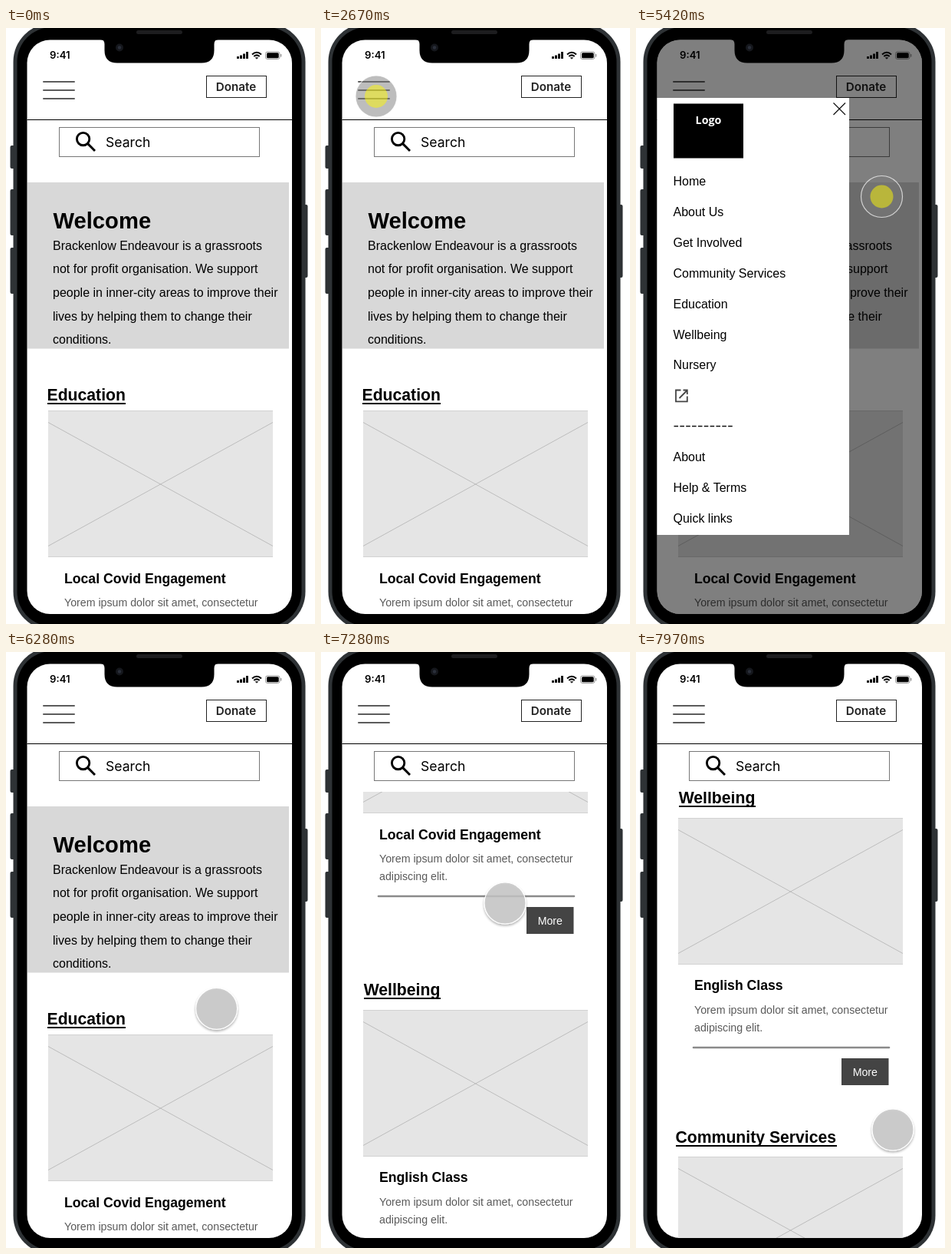
Recreate the animation shown at these times as an HTML page. Size 403 px wide and 776 px high, loop 8000 ms.

```html
<!DOCTYPE html>
<html lang="en">
<head>
<meta charset="utf-8">
<title>Mobile wireframe walkthrough</title>
<style>
  html, body { margin: 0; width: 100%; height: 100%; overflow: hidden; background: #fff; }
  svg { display: block; font-family: "Liberation Sans", Arial, sans-serif; }
  .ui { font-family: Inter, sans-serif; }
  .h2 { font-size: 21.2px; font-weight: 700; }
  .h3 { font-size: 17.65px; font-weight: 700; }
  .body { font-size: 16px; }
  .small { font-size: 14.2px; fill: #5a5a5a; }
</style>
</head>
<body>
<svg width="403" height="776">
  <defs>
    <clipPath id="screen"><rect x="27.500" y="15.500" width="345.500" height="747.500" rx="30"/></clipPath>
    <clipPath id="view"><rect x="27" y="182" width="346" height="581"/></clipPath>
    <g id="image">
      <rect x="55" y="498" width="293" height="191" fill="#e5e5e5"/>
      <path d="M55 513.5L348 674.5M55 674.5L348 513.5" stroke="#b8b8b8" stroke-width=".9"/>
      <path d="M55 498.5H348M55 688.5H348" stroke="#d2d2d2"/>
    </g>
    <g id="card">
      <use href="#image"/>
      <g class="small">
        <text x="76" y="753">Yorem ipsum dolor sit amet, consectetur</text>
        <text x="76" y="776">adipiscing elit.</text>
      </g>
      <path d="M75 797H330" stroke="#8a8a8a" stroke-width="2.6" stroke-linecap="round"/>
      <rect x="268" y="811" width="61.500" height="35" fill="#444"/>
      <text x="298.800" y="834" font-size="14.2" fill="#fff" text-anchor="middle">More</text>
    </g>
    <filter id="shadow" x="-30%" y="-30%" width="160%" height="160%">
      <feDropShadow dx="0" dy="2" stdDeviation="1.6" flood-opacity=".35"/>
    </filter>
  </defs>

  <!-- phone body -->
  <g fill="#2e3235">
    <rect x="5.500" y="153" width="8" height="30" rx="2"/>
    <rect x="5.500" y="210" width="8" height="60" rx="2"/>
    <rect x="5.500" y="286" width="8" height="60" rx="2"/>
    <rect x="386" y="230" width="7.500" height="95" rx="2"/>
    <rect x="9.500" y="-6" width="381" height="790" rx="50"/>
  </g>
  <rect x="14.500" y="-1" width="371" height="780" rx="45"/>
  <rect x="170" y="3" width="60" height="5" rx="2.500" fill="#1d1d1f"/>

  <g clip-path="url(#screen)">
    <rect x="27" y="15" width="346" height="748" fill="#fff"/>

    <!-- scrolling page -->
    <g clip-path="url(#view)"><g id="page">
      <rect x="28" y="201" width="341" height="216.500" fill="#d8d8d8"/>
      <text x="61.500" y="260.500" font-size="29.2" font-weight="700">Welcome</text>
      <g class="body">
        <text x="61" y="288.500">Brackenlow Endeavour is a grassroots</text>
        <text x="61" y="319">not for profit organisation. We support</text>
        <text x="61" y="349.500">people in inner-city areas to improve their</text>
        <text x="61" y="380.500">lives by helping them to change their</text>
        <text x="61" y="410.500">conditions.</text>
      </g>
      <g class="h2">
        <text x="53.500" y="485">Education</text>
        <text x="55.700" y="926">Wellbeing</text>
        <text x="51.500" y="1368">Community Services</text>
      </g>
      <path d="M54 489H156M56 930H156M52 1372H262" stroke="#000" stroke-width="2"/>
      <use href="#card"/>
      <use href="#card" y="447"/>
      <use href="#image" y="888"/>
      <g class="h3">
        <text x="76" y="723">Local Covid Engagement</text>
        <text x="76" y="1169">English Class</text>
      </g>
    </g></g>

    <!-- header -->
    <g class="ui">
      <text x="57" y="40" font-size="13.2" font-weight="600">9:41</text>
      <text x="300" y="82" font-size="15.2" font-weight="600" fill="#222" text-anchor="middle">Donate</text>
      <text x="130" y="154.500" font-size="17.6">Search</text>
    </g>
    <path d="M302.500 40V37M306.500 40V35.500M310.500 40V33.500M314.500 40V31" stroke="#000" stroke-width="2.800"/>
    <g fill="none" stroke="#000" stroke-width="2">
      <path d="M321 34.500Q327 29 333 34.500M323.300 37Q327 33.700 330.700 37"/>
      <path d="M325.500 38.800H328.500L327 40.200Z" stroke-width="1"/>
    </g>
    <rect x="338.500" y="31" width="18.500" height="9.500" rx="2.500" fill="none" stroke="#999"/>
    <rect x="340" y="32.300" width="15.700" height="7" rx="1.500"/>
    <path d="M358.700 34V37.500" stroke="#999" stroke-width="1.300"/>
    <path d="M49 70H89M49 81H89M49 92H89" stroke="#5c5c5c" stroke-width="2" stroke-linecap="round"/>
    <g fill="none" stroke="#222">
      <rect x="261.500" y="62.500" width="78" height="28"/>
      <path d="M27 119.500H373" stroke="#000"/>
      <rect x="69.500" y="129.500" width="261" height="38" stroke="#777"/>
      <g stroke="#000" stroke-width="2.900">
        <circle cx="100.600" cy="144.600" r="8.200"/>
        <path d="M106.400 150.400L116 160"/>
      </g>
    </g>

    <!-- side menu -->
    <g id="menu">
      <rect x="27" y="15" width="346" height="748" opacity=".5"/>
      <rect x="27" y="91" width="251" height="569" fill="#fff"/>
      <rect x="49" y="98.500" width="91" height="71"/>
      <text x="94.500" y="125" fill="#fff" text-anchor="middle"
        style="font:700 14.300px 'Open Sans','Noto Sans',sans-serif">Logo</text>
      <path d="M257.500 97.500L273 113M273 97.500L257.500 113" stroke="#111" stroke-width="1.200"/>
      <g id="items" class="body"></g>
      <path d="M58.500 471.500H52V486.300H66.800V479.500M61.500 471.500H66.800V477M66.500 472L56.500 482"
        fill="none" stroke="#444" stroke-width="1.800"/>
      <path d="M49.500 518.500H126" stroke="#111" stroke-width="1.500" stroke-dasharray="5.600 2.250"/>
    </g>
  </g>

  <!-- notch -->
  <path d="M123 15Q128.500 15 128.500 21V29Q128.500 45.500 145 45.500H255Q271.500 45.500 271.500 29V21Q271.500 15 277 15Z"/>
  <circle cx="148" cy="25.500" r="5" fill="#15171c"/>
  <circle cx="148" cy="25.500" r="2.200" fill="#2a2f3a"/>

  <g id="cursor">
    <circle id="disc" r="27" stroke="#fff" stroke-width="1.200"/>
    <circle id="dot" r="15" fill="rgba(255,250,4,.5)"/>
  </g>
</svg>
<script>
  const $ = id => document.getElementById(id);
  const LOOP = 8000, STEP = 66.9;   // the picture advances in steps of 66.9 ms

  $('items').innerHTML = ['Home', 'About Us', 'Get Involved', 'Community Services', 'Education',
    'Wellbeing', 'Nursery', '', '', 'About', 'Help &amp; Terms', 'Quick links']
    .map((s, i) => `<text x="48.500" y="${205 + i * 39.9}">${s}</text>`).join('');

  // cursor path: step, x, y
  const path = [
    [6, 440, 850], [8, 360, 710], [10, 275, 608], [11, 216, 530], [12, 168, 432],
    [14, 150, 300], [18, 145, 223],
    [24, 145, 223], [25, 141, 216], [28, 105, 145], [35, 72, 89],
    [54, 72, 89], [55, 127, 105], [58, 235, 165], [65, 320.5, 219.5],
    [87, 320.5, 219.5], [99, 247, 612],
    [101, 247, 612], [104, 224, 414], [106, 226, 312], [109, 240, 327],
    [118, 335, 622], [120, 335, 622]
  ];
  const presses = [[40, 42], [81, 83], [101, 106]];
  const within = (n, [a, b]) => n >= a && n < b;

  // speed at a key; zero beside a pause
  function slope(i, k) {
    const a = path[i - 1], b = path[i], c = path[i + 1];
    if (!a || !c || a[k] === b[k] || b[k] === c[k]) return 0;
    return (c[k] - a[k]) / (c[0] - a[0]);
  }

  function along(n, k) {
    let i = 0;
    while (i < path.length - 2 && n >= path[i + 1][0]) i++;
    const a = path[i], b = path[i + 1], d = b[0] - a[0];
    const u = Math.max(0, (n - a[0]) / d), v = 1 - u;
    return v * v * ((1 + 2 * u) * a[k] + u * d * slope(i, k))
         + u * u * ((1 + 2 * v) * b[k] - v * d * slope(i + 1, k));
  }

  // drag, then a flick that loses speed
  function scroll(n) {
    if (n < 101) return 0;
    if (n < 104) return 141 * ((n - 101) / 3) ** 2;
    return 141 + 669 * (1 - Math.exp(-.1407 * (n - 104)));
  }

  function draw(now) {
    const n = Math.floor((now % LOOP + 20) / STEP);
    const down = presses.some(p => within(n, p));
    $('page').setAttribute('transform', `translate(0 ${-Math.round(scroll(n))})`);
    $('menu').style.display = within(n, [42, 83]) ? '' : 'none';
    $('cursor').style.display = n >= 7 ? '' : 'none';
    $('cursor').setAttribute('transform', `translate(${along(n, 1)} ${along(n, 2)})`);
    $('disc').setAttribute('fill', down ? 'rgba(125,125,125,.5)' : 'rgba(199,199,199,.8)');
    $('disc').setAttribute('stroke-opacity', down ? .7 : 1);
    $('disc').setAttribute('filter', down ? 'none' : 'url(#shadow)');
    $('dot').style.display = down ? '' : 'none';
  }

  const start = performance.now();
  function tick() {
    draw(performance.now() - start);
    requestAnimationFrame(tick);
  }
  tick();
</script>
</body>
</html>
```
